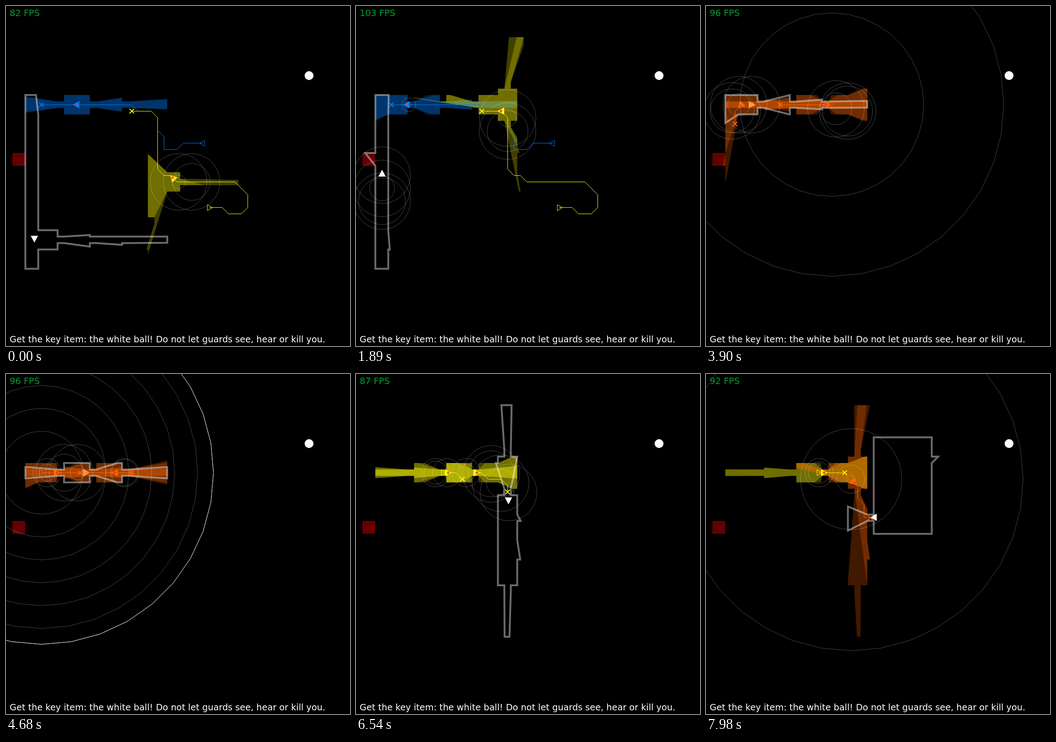
Recreate the animation shown at these times as an HTML page with a canvas. Size 752 px wide and 745 px high, loop 8000 ms.

```html
<!DOCTYPE html>
<html lang="en">
<head>
<meta charset="utf-8">
<title>Stealth game</title>
<style>
html, body { margin: 0; height: 100%; overflow: hidden; background: #000; }
canvas { display: block; }
</style>
</head>
<body>
<canvas id="stage" width="752" height="745"></canvas>
<script>
const ctx = document.getElementById('stage').getContext('2d');
const LOOP = 8, CELL = 14.1, TOP = -2.3, SIZE = 54;
const YELLOW = 'rgb(253,249,0)', BLUE = 'rgb(0,121,241)', ORANGE = 'rgb(255,100,0)';
const toScreen = (x, y) => [x * CELL, y * CELL + TOP];

// The map is carved out of solid rock, in grid cells.
const floor = new Set();
function carve(x, y, width, height) {
  for (let i = x; i < x + width; i++)
    for (let j = y; j < y + height; j++) floor.add(j * SIZE + i);
}
const isOpen = (x, y) => floor.has(Math.floor(y) * SIZE + Math.floor(x));

carve(3, 14, 2, 27);                       // west corridor
carve(1, 23, 2, 2);                        // start
for (const top of [14, 35])                // two rows of rooms joined by doors
  for (let x = 5; x < 22; x++) {
    const door = x % 5 === 3;
    carve(x, top + door, 1, door ? 1 : 3);
  }
carve(22, 13, 3, 5);                       // halls and doors from north to south
carve(22, 19, 3, 14);
carve(22, 34, 3, 7);
for (const y of [12, 18, 33]) carve(23, y, 1, 1);
carve(20, 5, 6, 7);
carve(25, 22, 1, 1);                       // east rooms
carve(26, 10, 9, 15);
carve(35, 13, 1, 1);
carve(25, 26, 2, 3);
carve(27, 27, 9, 1);

const corners = [];
for (let x = 1; x < SIZE; x++) for (let y = 1; y < SIZE; y++) {
  const count = isOpen(x, y) + isOpen(x - 1, y) + isOpen(x, y - 1) + isOpen(x - 1, y - 1);
  if (count % 2) corners.push([x, y]);
}

// Walks the grid from a point until the ray meets a wall or its limit.
function castRay(x, y, angle, limit) {
  const dx = Math.cos(angle), dy = Math.sin(angle);
  const sx = Math.sign(dx), sy = Math.sign(dy);
  let cx = Math.floor(x), cy = Math.floor(y), dist = 0;
  let nextX = ((sx > 0 ? cx + 1 : cx) - x) / dx, nextY = ((sy > 0 ? cy + 1 : cy) - y) / dy;
  while (isOpen(cx, cy) && dist < limit) {
    if (nextX < nextY) { dist = nextX; nextX += Math.abs(1 / dx); cx += sx; }
    else { dist = nextY; nextY += Math.abs(1 / dy); cy += sy; }
  }
  dist = Math.min(dist, limit);
  return toScreen(x + dx * dist, y + dy * dist);
}

// Rays go to every corner and a little past it on both sides.
function viewPath(px, py) {
  const x = px / CELL, y = (py - TOP) / CELL, rays = [];
  for (const [cx, cy] of corners) {
    const a = Math.atan2(cy - y, cx - x);
    rays.push([a, Math.hypot(cx - x, cy - y)]);
    for (const side of [-.02, .02])
      rays.push([(a + side + 3 * Math.PI) % (2 * Math.PI) - Math.PI, Infinity]);
  }
  const path = new Path2D();
  rays.sort((a, b) => a[0] - b[0]).forEach(r => path.lineTo(...castRay(x, y, ...r)));
  path.closePath();
  return path;
}

// A leg is a walk from a cell along compass moves, begun at a time with a speed in px/s.
function leg(at, x, y, moves, speed, options) {
  const points = [toScreen(x + .5, y + .5)];
  let length = 0;
  for (const move of moves.split(' ')) {
    const [, way, cells] = move.match(/([NESW]+)(.+)/);
    const dx = way.includes('E') - way.includes('W'), dy = way.includes('S') - way.includes('N');
    points.push(toScreen((x += dx * cells) + .5, (y += dy * cells) + .5));
    length += Math.hypot(dx, dy) * cells * CELL;
  }
  return { at, points, speed, length, left: length, shouts: 0, noise: 31, ...options };
}

const player = [
  leg(0, 3.9, 35.8, 'S1', 0),
  leg(.45, 3.54, 35.6, 'N20.6 E20', 96.5, { noise: 62 }),
  leg(5.9, 20.3, 15, 'SE2.84 S4.1 E2.5 W.1', 120, { noise: 62 })
];
const scout = [
  leg(0, 30, 21, 'W3 SW1 W2 N2 NW1 N2 NW1 W2 NW1 W14', 23, { color: BLUE, left: 76, noise: 15 }),
  leg(2.86, 5, 15, 'SW1 S2', 3, { color: ORANGE, shouts: 1 }),
  leg(4, 5, 15, 'E14', 50, { color: ORANGE, shouts: 6 }),
  leg(6.3, 13, 15, 'E2 SE1', 46, { color: YELLOW }),
  leg(7.4, 17, 15, 'E4', 20, { color: YELLOW })
];
const hunter = [
  leg(0, 31, 31, 'E2 SE1 E2 NE1 N2 NW2 W9 NW1 W1 NW1 N8 NW1 W3', 92, { color: YELLOW, left: 216, noise: 62 }),
  leg(2.4, 19, 16, 'E3 S1', 92, { color: YELLOW, noise: 62 }),
  leg(3.05, 22, 17, 'N1 W2 NW1 W12 SW1 W2 S6', 115, { color: YELLOW, noise: 62 }),
  leg(3.5, 19, 15, 'W8', 32, { color: ORANGE, shouts: 1 }),
  leg(5.6, 14.5, 15, 'E4.5', 60, { color: ORANGE, shouts: 2 }),
  leg(6.46, 18, 15, 'E1 SE1 E2 SE1 S1', 47, { color: YELLOW }),
  leg(7.76, 22, 16, 'SE1 S2 SE1 S2 E1', 45, { color: ORANGE, shouts: 1 })
];

const legAt = (legs, t) => legs.findLast(l => l.at <= t) || legs[0];

// Position and heading on the current leg.
function poseAt(legs, t) {
  const { at, points, speed, length, left } = legAt(legs, t);
  let rest = Math.min(length - left + speed * (t - at), length);
  for (let i = 1; ; i++) {
    const [x, y] = points[i - 1], dx = points[i][0] - x, dy = points[i][1] - y;
    const size = Math.hypot(dx, dy);
    if (rest <= size || i === points.length - 1) {
      const f = Math.min(rest / size, 1);
      return [x + dx * f, y + dy * f, Math.atan2(dy, dx)];
    }
    rest -= size;
  }
}

// Sounds: a footstep every two cells walked, and shouts when a guard is alarmed.
const SOUND_LIFE = .75, STRIDE = 2 * CELL, SHOUT = 376;
const sounds = [];
for (const legs of [player, scout, hunter]) {
  let walked = STRIDE, [px, py] = poseAt(legs, -.8);
  for (let t = -.8; t < LOOP; t += .01) {
    const [x, y] = poseAt(legs, t);
    walked += Math.hypot(x - px, y - py);
    if (walked >= STRIDE) {
      walked -= STRIDE;
      sounds.push([t, x, y, legAt(legs, t).noise]);
    }
    [px, py] = [x, y];
  }
  for (const { at, points, shouts } of legs)
    for (let i = 0; i < shouts; i++) sounds.push([at + i * .1, ...points[0], SHOUT]);
}

function stroke(path, color, width) {
  ctx.strokeStyle = color;
  ctx.lineWidth = width;
  ctx.stroke(path);
}

function fillCircle(x, y, r, color) {
  ctx.fillStyle = color;
  ctx.beginPath();
  ctx.arc(x, y, r, 0, 2 * Math.PI);
  ctx.fill();
}

function arrow([x, y, heading], nose, back, half) {
  const c = Math.cos(heading), s = Math.sin(heading), path = new Path2D();
  for (const [u, v] of [[nose, 0], [back, half], [back, -half]])
    path.lineTo(x + u * c - v * s, y + u * s + v * c);
  path.closePath();
  return path;
}

function drawSounds(t) {
  const rings = new Path2D();
  for (const [start, x, y, radius] of sounds) {
    const age = (t - start) / SOUND_LIFE;
    if (age < 0 || age > 1) continue;
    for (const r of [radius, radius * age]) {
      rings.moveTo(x + r, y);
      for (let i = 1; i <= 36; i++) {
        const a = i * Math.PI / 18;
        rings.lineTo(x + r * Math.cos(a), y + r * Math.sin(a));
      }
    }
  }
  stroke(rings, 'rgba(255,255,255,.27)', 1);
}

function drawRoute({ points, color }) {
  const line = new Path2D(), cross = new Path2D();
  for (const [x, y] of points) line.lineTo(Math.floor(x) + .5, Math.floor(y) + .5);
  const [x, y] = points.at(-1), [sx, sy] = points[0];
  for (const s of [-1, 1]) {
    cross.moveTo(x - 5, y - 5 * s);
    cross.lineTo(x + 5, y + 5 * s);
  }
  stroke(line, color, 1);
  stroke(cross, color, 2);
  stroke(arrow([sx, sy, Math.atan2(points[1][1] - sy, points[1][0] - sx)], 7, -4, 6.5), color, 1);
}

// Each guard looks from two nearby points, which gives soft shadow edges.
function drawSight([x, y, heading], color) {
  ctx.fillStyle = color;
  ctx.globalAlpha = .25;
  for (const offset of [-3, 3]) {
    let ex = x + offset * Math.cos(heading), ey = y + offset * Math.sin(heading);
    if (!isOpen(ex / CELL, (ey - TOP) / CELL)) [ex, ey] = [x, y];
    ctx.fill(viewPath(ex, ey));
  }
  ctx.globalAlpha = 1;
}

const fps = [82, 103, 109, 96, 101, 87, 92];
function drawText(text, y, color) {
  ctx.font = '19.3px "DejaVu Sans", sans-serif';
  ctx.fillStyle = color;
  ctx.fillText(text, 8, y);
}

function draw(t) {
  ctx.fillStyle = '#000';
  ctx.fillRect(0, 0, 752, 745);
  ctx.fillStyle = '#640000';
  ctx.fillRect(14, 322, 28, 28);
  fillCircle(662.5, 152.5, 9.7, '#fff');

  const hero = poseAt(player, t);
  ctx.fillStyle = '#fff';
  ctx.fill(arrow(hero, 9, -6, 8));

  const guards = [scout, hunter].map(legs => ({ pose: poseAt(legs, t), route: legAt(legs, t) }));
  for (const { pose, route } of guards) drawSight(pose, route.color);
  stroke(viewPath(hero[0], hero[1]), 'rgba(255,255,255,.42)', 4);
  for (const { route } of guards) drawRoute(route);
  for (const { pose, route } of guards) {
    ctx.fillStyle = route.color;
    ctx.fill(arrow(pose, 8, -7, 8));
    fillCircle(pose[0], pose[1], 3, 'rgba(245,45,65,.8)');
  }
  drawSounds(t);
  drawText(fps[Math.floor(t / 1.2)] + ' FPS', 22, 'rgb(0,158,47)');
  drawText('Get the key item: the white ball! Do not let guards see, hear or kill you.', 737, '#fff');
}

function tick() {
  draw(performance.now() / 1000 % LOOP);
  requestAnimationFrame(tick);
}
tick();
</script>
</body>
</html>
```
